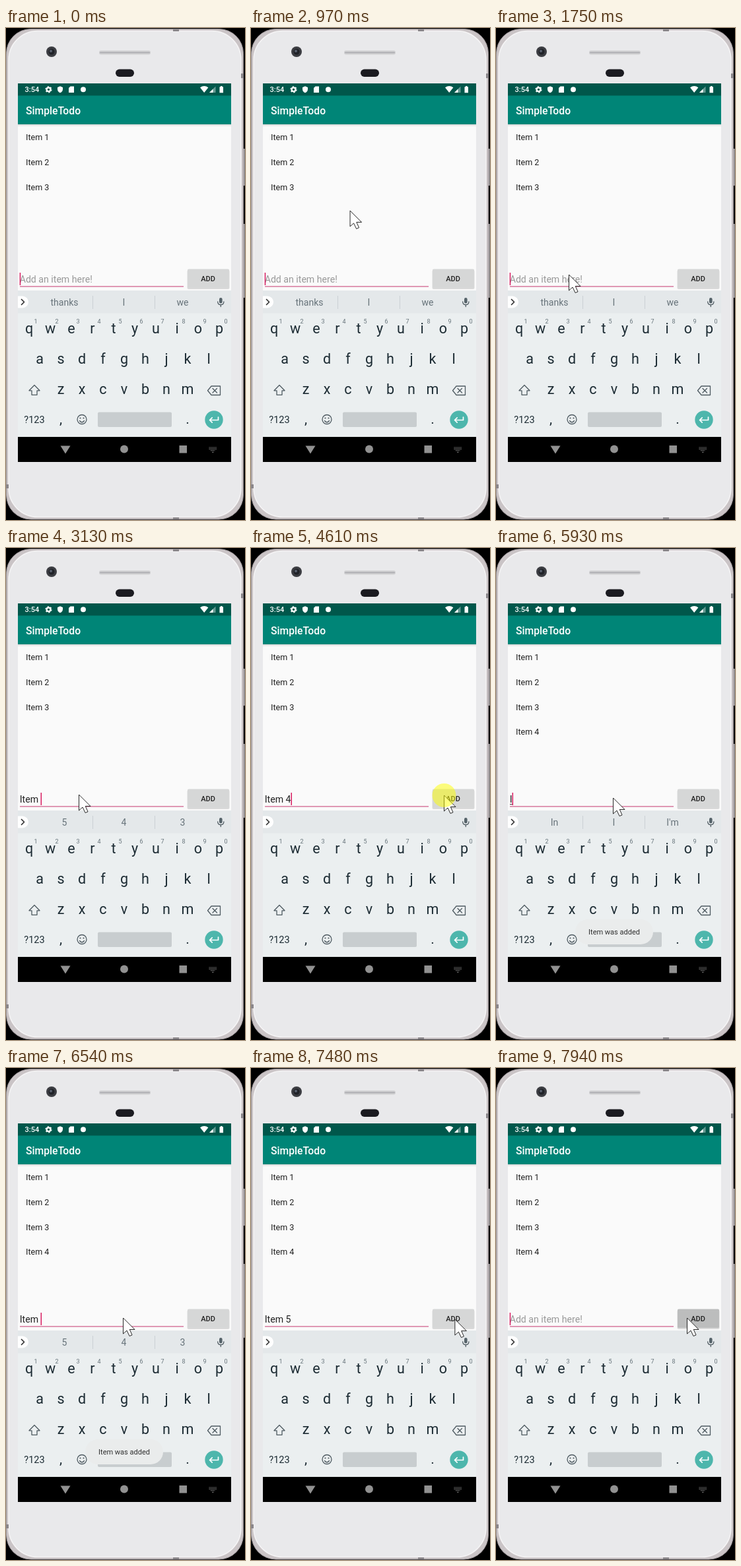
An HTML page that plays this animation: 362 by 746 pixels, repeating every 8 s.

```html
<!DOCTYPE html>
<html lang="en">
<head>
<meta charset="utf-8">
<title>Todo list demo</title>
<style>
html, body { margin: 0; width: 100%; height: 100%; overflow: hidden; background: #000; }
svg { display: block; width: 362px; height: 746px; font-family: Roboto, "Noto Sans", sans-serif; }
.mid { text-anchor: middle; }
.line { fill: none; stroke: #4f5b62; stroke-width: 1.3; stroke-linejoin: round; stroke-linecap: round; }
</style>
</head>
<body>
<svg id="stage" viewBox="0 0 362 746">
  <!-- phone body -->
  <rect x="358" y="183" width="3.5" height="56" fill="#c9c5c6"/>
  <rect x="358" y="297" width="3.5" height="112" fill="#c9c5c6"/>
  <rect x=".5" y="1.5" width="359" height="743.5" rx="37" fill="#cac4c6" stroke="#979093"/>
  <rect x="4" y="4.5" width="352" height="737" rx="44" fill="#e9e9eb" stroke="#f5f4f5" stroke-width="1.5"/>
  <path d="M253 2h9v3h-9zM356 69h4v7h-4zM0 692h4v6H0zM253 742h9v3h-9z" fill="#8a868a"/>
  <circle cx="69" cy="36" r="8" fill="#3c3d42"/>
  <circle cx="69" cy="36" r="4.5" fill="#202228"/>
  <circle cx="68" cy="35" r="2" fill="#59606d"/>
  <rect x="141" y="34" width="78" height="6.5" rx="3" fill="#d3d3d5"/>
  <rect x="142" y="36" width="76" height="2.5" rx="1.2" fill="#b4b4b8"/>
  <rect x="166" y="62.5" width="28" height="11.5" rx="5.7" fill="#1b1b20"/>

  <!-- app -->
  <rect x="18" y="84" width="323" height="574" fill="#fafafa"/>
  <rect x="18" y="146" width="323" height="1.5" fill="#d5d8d8"/>
  <rect x="18" y="147.5" width="323" height="1.5" fill="#ececec"/>
  <rect x="18" y="84" width="323" height="19" fill="#00574b"/>
  <rect x="18" y="102.5" width="323" height="43.5" fill="#008577"/>
  <g fill="#fff">
    <text x="28.5" y="97" font-size="11" font-weight="500">3:54</text>
    <circle cx="64.5" cy="93.3" r="2.9" fill="none" stroke="#fff" stroke-width="2.2"/>
    <circle cx="64.5" cy="93.3" r="4.4" fill="none" stroke="#fff" stroke-width="1.4" stroke-dasharray="2.3 2.3"/>
    <path d="M82 88.3l4 1.7v3c0 2.6-1.7 4.4-4 5.3-2.3-.9-4-2.7-4-5.3v-3z"/>
    <path d="M97.5 88.5h5.5v9.5h-8v-7z"/>
    <circle cx="117" cy="93.3" r="4"/>
    <path d="M294 90.3q6.2-4.6 12.4 0l-6.2 7.7z"/>
    <path d="M317.5 88.5v9.5h-9.5z" opacity=".4"/>
    <path d="M313.5 92.5v5.5h-5.5z"/>
    <path d="M323.5 89.3h1.5v-1.2h2.5v1.2h1.5v8.9h-5.5z"/>
    <text x="30" y="131" font-size="15.7" font-weight="500">SimpleTodo</text>
  </g>
  <g id="items" font-size="12.56" fill="#212121"></g>

  <!-- input row -->
  <rect x="21" y="391.4" width="248" height="1.1" fill="#cb4a7d"/>
  <text id="entry" y="386" x="20.7" font-size="14.13"></text>
  <rect id="compose" x="21" y="388.2" height="1" fill="#333"/>
  <rect id="caret" y="371" width="1.5" height="19" fill="#d81b60"/>
  <rect x="274.5" y="367" width="64" height="29" rx="2" opacity=".13"/>
  <rect id="button" x="275" y="365.5" width="63" height="28.5" rx="1.6"/>
  <text class="mid" x="306" y="384" font-size="11" font-weight="500" fill="#212121">ADD</text>

  <!-- keyboard -->
  <rect x="18" y="398" width="323" height="35" fill="#e4e8ea"/>
  <rect x="18" y="432.5" width="323" height="188" fill="#ebeff0"/>
  <path d="M18 406.5h7a9 9 0 0 1 0 18h-7z" fill="#fff"/>
  <path d="M23.5 411.5l4 4-4 4" class="line" style="stroke:#333;stroke-width:1.7"/>
  <path id="bars" d="M131.5 406v20M225.5 406v20" stroke="#cbd1d4"/>
  <g id="words" class="mid" font-size="14" fill="#67737a"></g>
  <rect x="323" y="409" width="4.6" height="8.5" rx="2.3" fill="#56636a"/>
  <path d="M320.7 415q0 4.6 4.6 4.6t4.6-4.6M325.3 420v2.5" class="line"/>
  <g id="keys" class="mid" fill="#1c2b33"></g>
  <path d="M43 541.5l8 8.3h-4v6.5h-8v-6.5h-4z" class="line"/>
  <path d="M311 543h13.5v13.500h-13.5l-5.5-6.75zM313 546.5l6.5 6.5m0-6.5l-6.5 6.5" class="line"/>
  <circle cx="115" cy="593.5" r="7" class="line"/>
  <path d="M111.5 595.5q3.5 4.5 7 0" class="line"/>
  <circle cx="112.5" cy="591.5" r="1.1" fill="#4f5b62"/>
  <circle cx="117.5" cy="591.5" r="1.1" fill="#4f5b62"/>
  <rect x="139" y="582.5" width="112" height="22.5" rx="2" fill="#c8cdcf"/>
  <circle cx="315" cy="594" r="13.7" fill="#4db6ac"/>
  <path d="M321.5 590v4.5h-13m3.7-3.7l-3.7 3.7 3.7 3.7" class="line" style="stroke:#fff;stroke-width:1.7"/>

  <!-- navigation bar -->
  <rect x="18" y="620" width="323" height="38"/>
  <g fill="#919191">
    <path d="M82.5 633.5h15l-7.5 12z"/>
    <circle cx="179" cy="638.5" r="6"/>
    <rect x="262.5" y="633" width="11.5" height="11.5"/>
    <path d="M307.500 636h11.500M307.500 638.300h11.500M310 640.600h6.500" stroke="#858585" stroke-width="1.200" stroke-dasharray="1.300 .7"/>
    <path d="M311.800 642.800h3l-1.500 1.500z"/>
  </g>

  <g id="toast">
    <rect x="120" y="563" width="118" height="38" rx="19" fill="#eaecec"/>
    <text class="mid" x="179" y="586" font-size="11" fill="#303030">Item was added</text>
  </g>
  <g id="mouse">
    <path d="M0 0V24L5.5 19L9.6 27.5L13.500 25.8L9.8 17.5H17.5Z" fill="#fff" stroke="#111" stroke-width=".9"/>
    <circle id="click" r="18" fill="#ff0" opacity=".5"/>
  </g>
</svg>
<script>
const LOOP = 8000;
const $ = id => document.getElementById(id);
const show = (node, alpha) => node.setAttribute('opacity', +alpha);
const within = (t, spans) => spans.some(([a, b]) => t >= a && t < b);
const ramp = (t, a, b) => Math.min(1, Math.max(0, (t - a) / (b - a)));

function addText(parent, text, x, y, size) {
  const node = document.createElementNS('http://www.w3.org/2000/svg', 'text');
  node.textContent = text;
  node.setAttribute('x', x);
  node.setAttribute('y', y);
  if (size) node.setAttribute('font-size', size);
  return parent.appendChild(node);
}

const items = [1, 2, 3, 4].map((n, i) => addText($('items'), 'Item ' + n, 30, 170.3 + i * 37.7));
const words = [88.5, 178.5, 267.5].map(x => addText($('words'), '', x, 421));

[['qwertyuiop', 35], ['asdfghjkl', 51], ['zxcvbnm', 83]].forEach(([row, x0], r) =>
  [...row].forEach((key, i) => {
    const x = x0 + i * 32;
    addText($('keys'), key, x, 462.5 + r * 46.3, 21.5);
    if (!r) addText($('keys'), (i + 1) % 10, x + 10, 447.5, 9).setAttribute('fill', '#66737a');
  }));
addText($('keys'), '?123', 43, 599, 14.5);
addText($('keys'), ',', 83, 600, 21);
addText($('keys'), '.', 275, 600, 21);

// time, typed text, suggestions
const typing = [
  [0, '', 'thanks I we'],
  [2440, 'I', "In I I'm"],
  [2670, 'It', "It's It Its"],
  [2750, 'Ite', 'Item Ite Its'],
  [2980, 'Item', 'Items Item Itemized'],
  [3130, 'Item ', '5 4 3'],
  [3510, 'Item 4', ''],
  [4850, '', ''],
  [5000, '', 'thanks I we'],
  [5850, 'I', 'thanks I we'],
  [5930, 'I', "In I I'm"],
  [6160, 'It', "It's It Its"],
  [6240, 'Ite', 'Item Ite Its'],
  [6470, 'Item', 'Items Item Itemized'],
  [6540, 'Item ', '5 4 3'],
  [6860, 'Item 5', ''],
  [7940, '', '']
];
const caretOff = [[430, 930], [1430, 1660], [4060, 4560], [5350, 5850], [7360, 7860]];
const clicks = [[1580, 1750], [4610, 4770], [7710, 7870]];
const presses = [[4770, 4930], [7870, LOOP]];

// start, end, then the start, control and end points of a curve
const moves = [
  [580, 1200, [237, 538], [175, 110], [110.5, 374]],
  [4060, 4560, [110.5, 374], [200, 395], [292.5, 375]],
  [4850, 5230, [292.5, 375], [235, 381], [177.5, 379]],
  [7150, 7630, [177.5, 379], [361, 385], [289.5, 379]]
];

function mouseAt(t) {
  const [a, b, p, q, r] = moves.filter(m => m[0] <= t).pop() || moves[0];
  const k = ramp(t, a, b), u = k * k * (3 - 2 * k), v = 1 - u;
  return [0, 1].map(i => p[i] * v * v + 2 * q[i] * u * v + r[i] * u * u);
}

function draw(t) {
  const [, text, hints] = typing.filter(s => s[0] <= t).pop();
  const entry = $('entry');
  entry.textContent = text.replace(' ', '\u00a0');
  const width = text ? entry.getComputedTextLength() : 0;
  $('caret').setAttribute('x', 20.7 + width);
  show($('caret'), !within(t, caretOff));
  $('compose').setAttribute('width', /^\w+$/.test(text) ? width : 0);
  entry.setAttribute('fill', text ? '#212121' : '#999');
  if (!text) entry.textContent = 'Add an item here!';

  const list = hints.split(' ');
  words.forEach((word, i) => word.textContent = list[i] || '');
  show($('bars'), hints !== '');

  show(items[3], t >= 4930);
  $('button').setAttribute('fill', within(t, presses) ? '#bcbdbd' : '#d6d7d7');
  show($('toast'), ramp(t, 4970, 5430) - ramp(t, 6930, 7400));

  $('mouse').setAttribute('transform', `translate(${mouseAt(t)})`);
  show($('mouse'), t >= 580);
  $('click').setAttribute('r', within(t, clicks) ? 18 : 0);
}

const start = performance.now();
function tick() {
  draw((performance.now() - start) % LOOP);
  requestAnimationFrame(tick);
}
tick();
</script>
</body>
</html>
```
